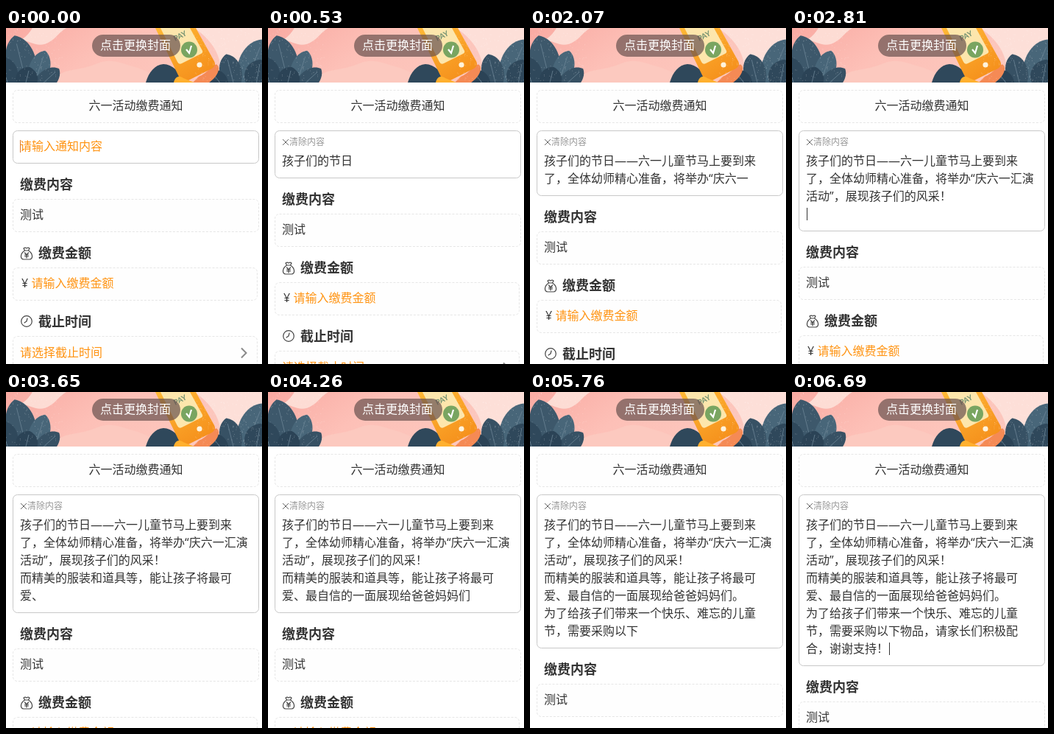
Write an HTML page that moves like this. It is 348x456 px and loops after 6720 ms.

```html
<!DOCTYPE html>
<html lang="zh-CN">
<head>
<meta charset="utf-8">
<title>缴费通知</title>
<style>
  html, body { margin: 0; width: 100%; height: 100%; overflow: hidden; background: #fff; }
  svg { display: block; width: 348px; height: 456px; }
  text { font: 16px "Noto Sans CJK SC", "Noto Sans CJK", sans-serif; fill: #333; white-space: pre; }
  .latin { font-family: "Open Sans", sans-serif; }
  .hint { fill: #ff9311; }
  .heading { font-size: 18px; font-weight: 700; }
  .dashed { fill: #fefefe; stroke: #e6e6e6; stroke-dasharray: 3 2; }
  .icon { fill: none; stroke: #444; stroke-width: 1.2; stroke-linecap: round; stroke-linejoin: round; }
  .vein { fill: none; stroke: #6d8798; stroke-width: .7; }
</style>
</head>
<body>
<svg viewBox="0 0 348 456" xmlns="http://www.w3.org/2000/svg">
  <defs>
    <clipPath id="coverClip"><rect width="348" height="74"/></clipPath>
    <linearGradient id="sky" x2="1" y2=".3">
      <stop stop-color="#f9aaa2"/><stop offset=".45" stop-color="#fdc0b7"/><stop offset="1" stop-color="#fcc8be"/>
    </linearGradient>
    <linearGradient id="phone" x2=".7" y2="1">
      <stop stop-color="#ffb936"/><stop offset="1" stop-color="#f58f1b"/>
    </linearGradient>
  </defs>

  <g clip-path="url(#coverClip)">
    <rect width="348" height="74" fill="url(#sky)"/>
    <path d="M36 0H82C70 7 66 18 52 22C40 25 31 17 20 16C28 12 32 6 36 0Z" fill="#fddcd4"/>
    <path d="M60 74C78 52 96 60 122 49C142 40 154 47 172 52C186 56 200 62 214 74Z" fill="#fcc9bf"/>
    <path d="M256 0H348V74H290C296 48 288 22 256 0Z" fill="#fddfd8"/>
    <g id="leaves"></g>
    <path d="M190 74C194 60 202 50 214 49C226 49 236 60 246 74Z" fill="#2f485b"/>
    <path d="M262 66C274 62 282 47 287 50C292 54 288 66 276 74H254Z" fill="#f58a55"/>
    <path d="M203 0L236 68Q239 75 246 72L280 55Q286 51 283 45L258 0Z" fill="url(#phone)"/>
    <path d="M210 0L233 46Q235 50 239 48L265 35Q269 33 266 29L250 0Z" fill="#fde6ac"/>
    <path d="M228 74C230 66 235 64 241 68L256 74Z" fill="#ffb02f"/>
    <circle cx="263" cy="50" r="3.6" fill="#fff3dc"/>
    <text transform="translate(230 18) rotate(-27)" style="font:700 10px Lato,sans-serif;fill:#6f8f70">PAY</text>
    <circle cx="249" cy="29.5" r="11" fill="#79a561"/>
    <path d="M245 29L249 34L252 24" fill="none" stroke="#fff" stroke-width="2.2"/>
    <path id="grain" stroke="#fff" stroke-opacity=".35" stroke-width=".8"/>
  </g>
  <rect x="117" y="9" width="120" height="30" rx="15" fill="#68524f" fill-opacity=".7"/>
  <text x="128" y="29" style="fill:#fff">点击更换封面</text>

  <rect class="dashed" x="9.5" y="84.5" width="334" height="44" rx="6"/>
  <text x="112.5" y="111">六一活动缴费通知</text>

  <rect id="field" x="9.5" y="139.5" width="334" height="44" rx="6" fill="#fff" stroke="#c8c8c8"/>
  <text id="placeholder" class="hint" x="19" y="166">请输入通知内容</text>
  <g id="clear">
    <path d="M20 151L28 159M28 151L20 159" stroke="#666"/>
    <text x="29" y="159" style="font-size:12px;fill:#999">清除内容</text>
  </g>
  <g id="message"></g>
  <rect id="caret" width="1" height="17"/>

  <g id="lower">
    <text class="heading" x="19" y="219">缴费内容</text>
    <rect class="dashed" x="9.5" y="232.5" width="334" height="44" rx="6"/>
    <text x="19" y="259">测试</text>

    <g class="icon" transform="translate(28 306)">
      <path d="M-2.5 -4C-9 0 -9 8 -4 8H4C9 8 9 0 2.5 -4ZM-2.5 -4L-4 -7L-2 -8L0 -7L2 -8L4 -7L2.5 -4M-2.5 -1L0 2L2.5 -1M0 2V6M-2.5 2H2.5M-2.5 4H2.5"/>
    </g>
    <text class="heading" x="44" y="312">缴费金额</text>
    <rect class="dashed" x="9.5" y="325.5" width="332" height="44" rx="6"/>
    <text x="21" y="352" class="latin" font-weight="700">¥</text>
    <text class="hint" x="34.5" y="352">请输入缴费金额</text>

    <g class="icon" transform="translate(28 398)">
      <circle r="7.3"/><path d="M1 -4L0 0L-3 2"/>
    </g>
    <text class="heading" x="44" y="405">截止时间</text>
    <rect class="dashed" x="9.5" y="418.5" width="332" height="44" rx="6"/>
    <text class="hint" x="19" y="446">请选择截止时间</text>
    <path d="M320 434.5L326.5 441L320 447.5" fill="none" stroke="#8a8a8a" stroke-width="2"/>
  </g>
</svg>
<script>
const LOOP = 6720, LINE = 24;
const $ = id => document.getElementById(id);

// Rows as wrapped on screen; "\n" marks a typed line break.
const rows = [
  "孩子们的节日——六一儿童节马上要到来",
  "了，全体幼师精心准备，将举办“庆六一汇演",
  "活动”，展现孩子们的风采！\n",
  "而精美的服装和道具等，能让孩子将最可",
  "爱、最自信的一面展现给爸爸妈妈们。\n",
  "为了给孩子们带来一个快乐、难忘的儿童",
  "节，需要采购以下物品，请家长们积极配",
  "合，谢谢支持！"
];
const total = rows.join("").length;

// Typing bursts: start ms, end ms, characters shown at start and at end.
const bursts = [
  [140, 530, 0, 6], [630, 790, 7, 11], [850, 1490, 12, 25],
  [1530, 2070, 26, 36], [2170, 2200, 37, 38], [2240, 2810, 39, 52],
  [2840, 2840, 53, 53], [2940, 3570, 54, 70], [3620, 3650, 71, 72],
  [3690, 4260, 73, 86], [4360, 4860, 87, 98], [4960, 4960, 99, 99],
  [5060, 5660, 100, 113], [5760, 6410, 114, 128], [6510, 6630, 129, 131]
];

function typedCount(t) {
  const burst = bursts.filter(b => b[0] <= t).pop();
  if (!burst) return 0;
  const [start, end, first, last] = burst;
  if (t >= end) return last;
  return first + Math.floor((t - start) / (end - start) * (last - first) + 1e-6);
}

function leaf(x, y, length, angle, width, color) {
  const w = width, l = length;
  return `<g transform="translate(${x} ${y}) rotate(${angle})">
    <path d="M0 0C${-w} ${-l * .2} ${-w} ${-l * .85} 0 ${-l}C${w} ${-l * .85} ${w} ${-l * .2} 0 0Z" fill="${color}"/>
    <path class="vein" d="M0 0V${-l * .85}"/></g>`;
}

$("leaves").innerHTML = [
  [30, 84, 76, -14, 27, "#3d586b"], [6, 86, 50, -18, 24, "#2f485b"],
  [36, 84, 56, 18, 19, "#486679"], [38, 86, 46, 48, 17, "#375164"],
  [24, 86, 34, 14, 20, "#2b4356"],
  [322, 84, 74, 22, 27, "#486679"], [312, 86, 52, -14, 20, "#375164"],
  [300, 86, 36, -38, 16, "#2b4356"], [338, 88, 46, 10, 24, "#2f485b"]
].map(args => leaf(...args)).join("");

// Seeded paper grain near both ends of the cover.
let seed = 7;
const random = () => (seed = seed * 16807 % 2147483647) / 2147483647;
$("grain").setAttribute("d", Array.from({ length: 420 }, (_, i) => {
  const x = i % 3 ? 256 + random() * 92 : random() * 76;
  return `M${x.toFixed(1)} ${(random() * 74).toFixed(1)}h.8`;
}).join(""));

const lineTexts = rows.map((_, i) => {
  const text = document.createElementNS("http://www.w3.org/2000/svg", "text");
  text.setAttribute("x", 19);
  text.setAttribute("y", 186 + LINE * i);
  $("message").append(text);
  return text;
});

const show = (id, on) => $(id).setAttribute("visibility", on ? "visible" : "hidden");

function placeCaret(x, y, color) {
  $("caret").setAttribute("x", x);
  $("caret").setAttribute("y", y);
  $("caret").setAttribute("fill", color);
}

function render(t) {
  const count = typedCount(t);
  let left = count, lines = 0, afterBreak = false;
  rows.forEach((row, i) => {
    const part = row.slice(0, Math.max(0, left));
    if (part) lines = i + 1;
    if (left === row.length && row.endsWith("\n")) {
      afterBreak = true;
      lines = i + 2;
    }
    left -= row.length;
    lineTexts[i].innerHTML = part.trim().replace(/[“”—]+/g, '<tspan class="latin">$&</tspan>');
  });

  const height = lines ? 40 + LINE * lines : 44;
  $("field").setAttribute("height", height);
  $("lower").setAttribute("transform", `translate(0 ${height - 44})`);
  show("placeholder", !count);
  show("clear", count > 0);

  const finished = count === total && t >= 6690;
  show("caret", t < 140 || afterBreak || finished);
  if (!count) placeCaret(19, 152, "#d9772b");
  else placeCaret(finished ? 132 : 20, 172 + LINE * (lines - 1), "#333");
}

const began = performance.now();
function tick() {
  render((performance.now() - began) % LOOP);
  requestAnimationFrame(tick);
}
tick();
</script>
</body>
</html>
```
